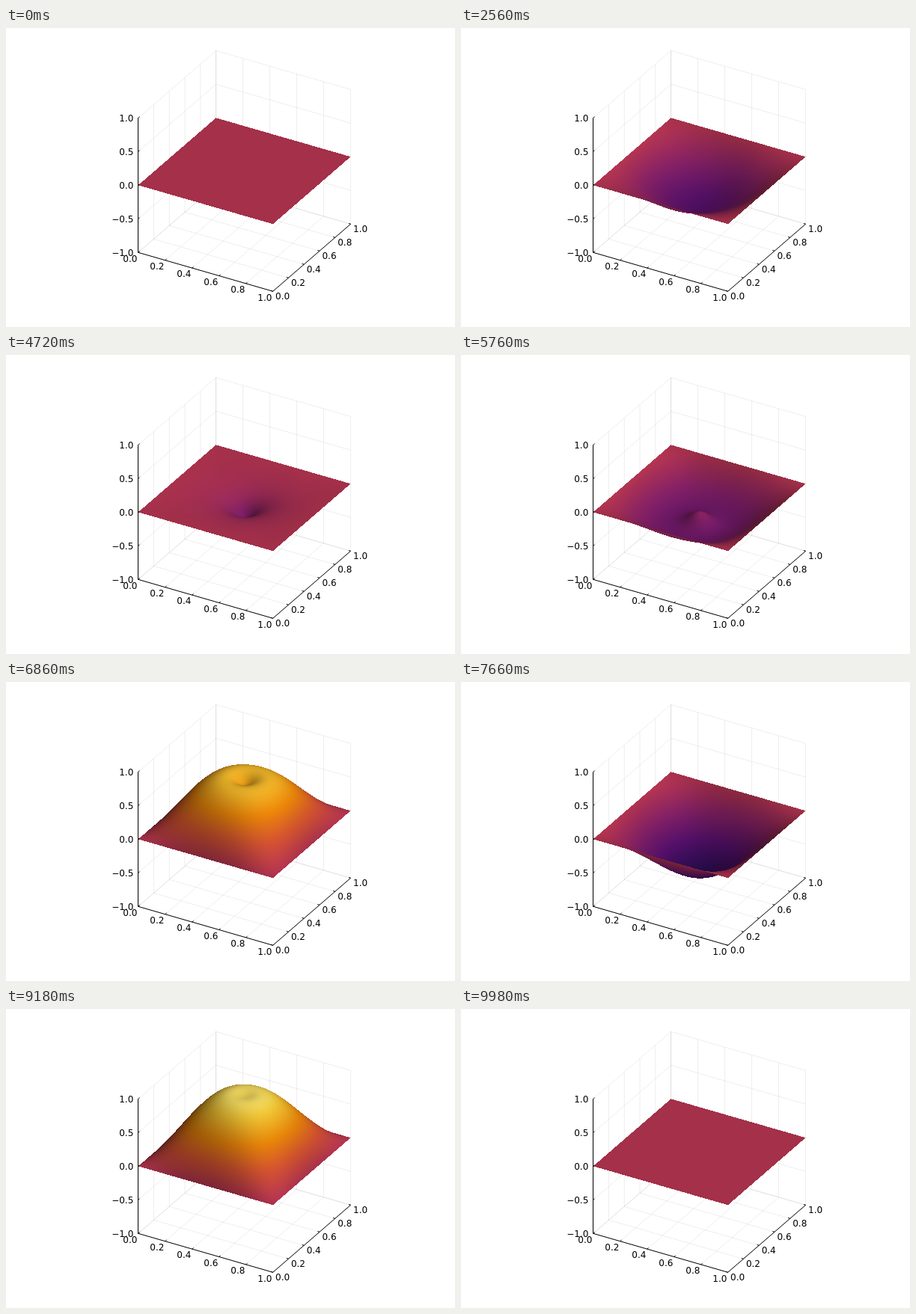
Recreate the animation shown at these times as an HTML page with a canvas. Size 600 by 400 pixels, loop 10 s.

```html
<!DOCTYPE html>
<html lang="en">
<head>
<meta charset="utf-8">
<title>Driven membrane</title>
<style>
  html, body { margin: 0; width: 100%; height: 100%; overflow: hidden; background: #fff; }
  svg, canvas { position: absolute; left: 0; top: 0; width: 600px; height: 400px; }
  text { font: 12px "DejaVu Sans", sans-serif; fill: #000; }
  polyline { fill: none; }
</style>
</head>
<body>
<svg id="grid" viewBox="0 0 600 400" stroke="#000" stroke-opacity=".1" stroke-width=".7"></svg>
<canvas id="sheet" width="600" height="400"></canvas>
<svg id="axes" viewBox="0 0 600 400"></svg>
<script>
const project = (x, y, z) => [
  176.7 + 179.95 * x + 103.9 * y,
  210.3 + 51.95 * x - 90 * y - 90 * z
];

// ---- axes and grid ----
function add(parent, tag, attrs, text) {
  const el = document.createElementNS("http://www.w3.org/2000/svg", tag);
  for (const key in attrs) el.setAttribute(key, attrs[key]);
  if (text) el.textContent = text;
  parent.appendChild(el);
}

function line(parent, points, attrs) {
  add(parent, "polyline", { points: points.map(p => p.join()).join(" "), ...attrs });
}

function label(value, x, y, anchor) {
  add(axes, "text", { x, y: y + 4.4, "text-anchor": anchor }, value.toFixed(1).replace("-", "\u2212"));
}

function tick([x, y], dx, dy) {
  line(axes, [[x, y], [x + dx, y + dy]], { stroke: "#000" });
}

function drawFrame() {
  const grid = document.getElementById("grid");
  for (let i = 0; i <= 5; i++) {
    const v = i / 5;
    line(grid, [project(v, 0, -1), project(v, 1, -1), project(v, 1, 1)]);
    line(grid, [project(1, v, -1), project(0, v, -1), project(0, v, 1)]);
    const a = project(v, 0, -1), b = project(1, v, -1);
    tick(a, 1.9, -1.6);
    tick(b, -2.6, -0.8);
    label(v, a[0] - 10.8, a[1] + 8, "middle");
    label(v, b[0] + 13, b[1] + 6.6, "middle");
  }
  for (let z = -1; z <= 1; z += 0.5) {
    line(grid, [project(0, 0, z), project(0, 1, z), project(1, 1, z)]);
    const p = project(0, 0, z);
    tick(p, 1.9, -1.6);
    label(z, 170.3, p[1] + 0.4, "end");
  }
  line(axes, [[176.5, 120.3], [176.5, 300.3]], { stroke: "#000" });
  line(axes, [project(0, 0, -1), project(1, 0, -1), project(1, 1, -1)], { stroke: "#000" });
}

// ---- damped membrane, driven at its centre ----
const SPEED = 0.5, DAMP = 0.25, DRIVE = 2.45, FORCE = 0.255, SPREAD = 0.042;
const N = 64, M = 10, SIDE = N + 1;

const waves = Array.from({ length: M }, (_, k) =>
  Float64Array.from({ length: SIDE }, (_, i) => Math.sin((2 * k + 1) * Math.PI * i / N)));

function amplitude(a, b, t) {
  const m = 2 * a + 1, n = 2 * b + 1, k2 = Math.PI ** 2 * (m * m + n * n);
  const sign = (a + b) % 2 ? -1 : 1;
  const f = 4 * FORCE * sign * Math.exp(-SPREAD * SPREAD * k2 / 2);
  const w2 = SPEED * SPEED * k2, w = Math.sqrt(w2 - DAMP * DAMP / 4);
  const d = w2 - DRIVE * DRIVE, e = DAMP * DRIVE;
  const forced = d * Math.sin(DRIVE * t) - e * Math.cos(DRIVE * t);
  const c = (DAMP * e / 2 - DRIVE * d) / w;
  const free = Math.exp(-DAMP * t / 2) * (e * Math.cos(w * t) + c * Math.sin(w * t));
  return f * (forced + free) / (d * d + e * e);
}

const height = new Float64Array(SIDE * SIDE);

function solve(t) {
  height.fill(0);
  if (t === 0) return;
  for (let a = 0; a < M; a++) {
    const row = new Float64Array(SIDE);
    for (let b = 0; b < M; b++) {
      const q = amplitude(a, b, t);
      for (let j = 1; j < N; j++) row[j] += q * waves[b][j];
    }
    for (let j = 1; j < N; j++)
      for (let i = 1; i < N; i++) height[j * SIDE + i] += waves[a][i] * row[j];
  }
}

// ---- shading ----
const ramp = ["000004", "210c4a", "57106e", "8a226a", "bc3754", "e35933", "f98e09", "f9cb35", "fcffa4"]
  .map(hex => [0, 2, 4].map(i => parseInt(hex.slice(i, i + 2), 16)));
const LIGHT = [0.48, -0.1, 0.82];

function paint(z, sx, sy) {
  const len = Math.hypot(sx, sy, 1);
  const dot = (LIGHT[2] - LIGHT[0] * sx - LIGHT[1] * sy) / len;
  const shade = 0.3 + 0.7 * Math.max(0, dot);
  const p = Math.min(7.999, Math.max(0, (z + 1) * 4)), i = Math.floor(p);
  return ramp[i].map((c, k) => shade * (c + (ramp[i + 1][k] - c) * (p - i)));
}

const ctx = document.getElementById("sheet").getContext("2d");
const image = ctx.createImageData(600, 400);
const pixels = new Uint32Array(image.data.buffer);

function triangle(A, B, C) {
  const [ax, ay] = A.at, [bx, by] = B.at, [cx, cy] = C.at;
  const area = (bx - ax) * (cy - ay) - (by - ay) * (cx - ax);
  if (Math.abs(area) < 1e-9) return;
  const x0 = Math.ceil(Math.min(ax, bx, cx) - 0.5), x1 = Math.floor(Math.max(ax, bx, cx) - 0.5);
  const y0 = Math.max(0, Math.ceil(Math.min(ay, by, cy) - 0.5));
  const y1 = Math.min(399, Math.floor(Math.max(ay, by, cy) - 0.5));
  for (let y = y0; y <= y1; y++) {
    for (let x = x0; x <= x1; x++) {
      const px = x + 0.5, py = y + 0.5;
      const v = ((px - ax) * (cy - ay) - (py - ay) * (cx - ax)) / area;
      const w = ((bx - ax) * (py - ay) - (by - ay) * (px - ax)) / area;
      const u = 1 - v - w;
      if (u < -1e-6 || v < -1e-6 || w < -1e-6) continue;
      const mix = k => Math.round(u * A.rgb[k] + v * B.rgb[k] + w * C.rgb[k]);
      pixels[y * 600 + x] = (255 << 24 | mix(2) << 16 | mix(1) << 8 | mix(0)) >>> 0;
    }
  }
}

function drawSheet(t) {
  solve(t);
  const h = (i, j) => height[j * SIDE + i];
  // Slopes are halved because the plot box is a cube with z from -1 to 1.
  const slope = (lo, hi, steps) => (hi - lo) * N / steps / 2;
  const verts = [];
  for (let j = 0; j <= N; j++) {
    for (let i = 0; i <= N; i++) {
      const l = Math.max(0, i - 1), r = Math.min(N, i + 1);
      const d = Math.max(0, j - 1), u = Math.min(N, j + 1);
      verts.push({
        at: project(i / N, j / N, h(i, j)),
        rgb: paint(h(i, j), slope(h(l, j), h(r, j), r - l), slope(h(i, d), h(i, u), u - d))
      });
    }
  }
  pixels.fill(0);
  // Back to front
  for (let j = N - 1; j >= 0; j--) {
    for (let i = 0; i < N; i++) {
      const k = j * SIDE + i;
      triangle(verts[k], verts[k + SIDE], verts[k + SIDE + 1]);
      triangle(verts[k], verts[k + SIDE + 1], verts[k + 1]);
    }
  }
  ctx.putImageData(image, 0, 0);
}

// ---- playback: 500 steps of 20 ms ----
const axes = document.getElementById("axes");
let shown = -1;

function play() {
  const step = Math.floor(performance.now() % 10000 / 20);
  const resting = step < 12 || step === 499;
  const now = resting ? 0 : step;
  if (now !== shown) {
    shown = now;
    drawSheet(now * 0.02);
  }
  requestAnimationFrame(play);
}

drawFrame();
play();
</script>
</body>
</html>
```
